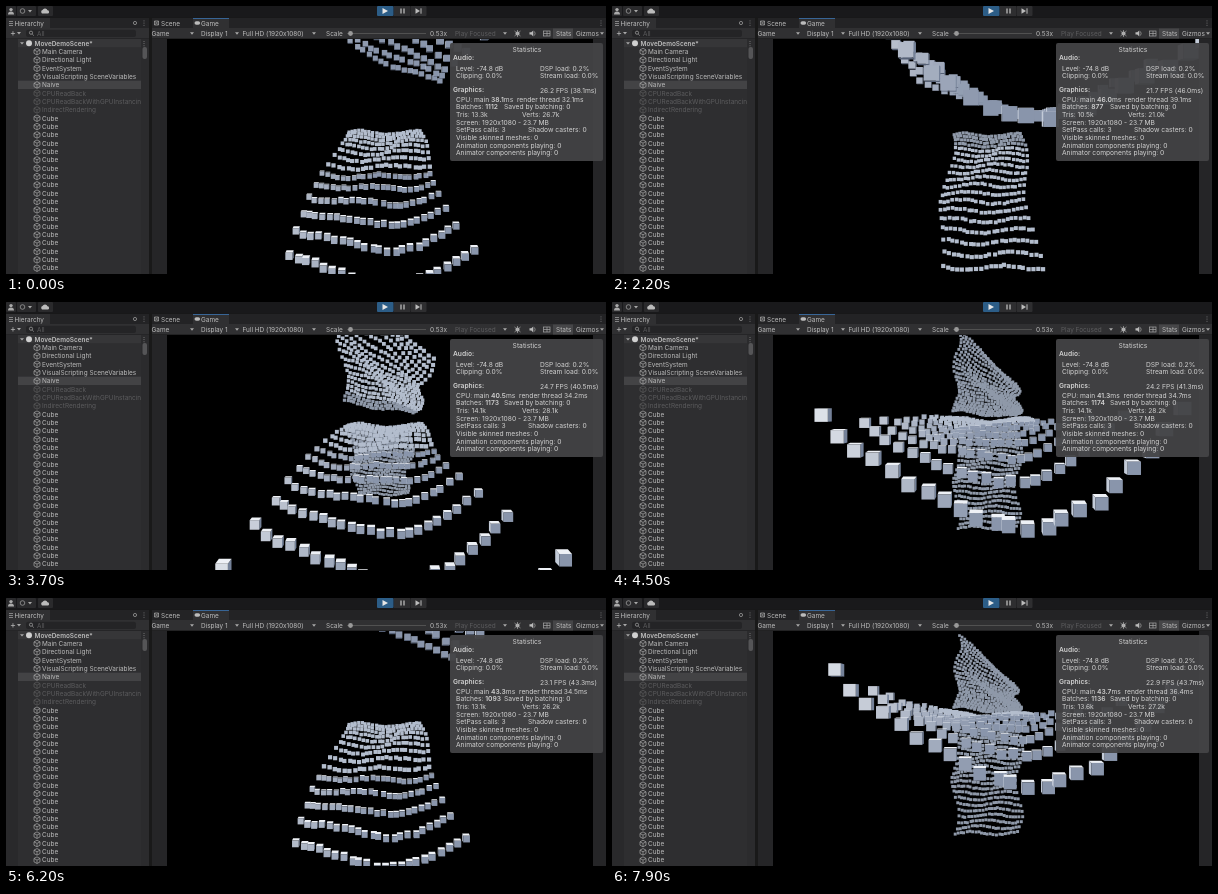
Write an HTML page with a canvas that moves like this. It is 600 px wide and 268 px high and loops after 8 s.

```html
<!DOCTYPE html>
<html lang="en">
<head>
<meta charset="utf-8">
<title>Moving cubes in an editor</title>
<style>
  html, body { margin: 0; width: 100%; height: 100%; overflow: hidden; background: #191919; }
  canvas, svg { position: absolute; left: 0; top: 0; width: 600px; height: 268px; }
  text { font: 6.45px Inter, "Liberation Sans", sans-serif; fill: #bdbdbd; white-space: pre; }
  .stats text { font-size: 6.7px; fill: #d2d2d2; }
  .dim { fill: #5c5c5e; }
  .bold { font-weight: 600; }
  .line { fill: none; stroke: #a8a8a8; stroke-width: .7; }
</style>
</head>
<body>
<canvas id="view" width="600" height="268"></canvas>
<svg id="ui" viewBox="0 0 600 268"></svg>
<script>
const LOOP = 8000, STEP = 100, PERIOD = Math.PI;
const ROWS = 24, COLS = 22, REACH = 1.6, NEAR = .13;
const AXIS = { x: 375, y: 118 };
const HALF_WIDTH = 32, DROP = 75, RISE = 45, SAG = 28;
const { sin, cos, exp, floor } = Math;
const ctx = document.getElementById('view').getContext('2d');
const ui = document.getElementById('ui');

function noise(n) {
  const s = sin(n * 12.9898) * 43758.5453;
  return s - floor(s) - .5;
}

const bell = (x, middle, spread) => exp(-(((x - middle) / spread) ** 2));

// One blade of cubes swings about a far horizontal axis: from hanging down (angle 0),
// towards the camera (a quarter turn) and on to standing up (half a turn).
function blade(age) {
  const angle = .82 + .57 * age;
  if (angle < -.75 || angle > 3.6) return [];
  const forward = sin(angle) * (sin(angle) < 0 ? .3 : 1);
  const up = Math.max(0, -cos(angle));
  const height = cos(angle) * (cos(angle) > 0 ? DROP : RISE);
  const hollow = .12 + 1.2 * bell(angle, 2.4, .35);
  const cubes = [];
  for (let r = 0; r < ROWS; r++) {
    const rho = .12 + (REACH - .12) * (r / (ROWS - 1)) ** 1.3;
    const depth = 1 - rho * forward;
    if (rho < hollow || depth < NEAR) continue;
    const sag = SAG * rho * rho * Math.max(0, forward) ** 3;
    const sway = .12 * sin(rho * 7 + age);
    for (let c = 0; c < COLS; c++) {
      const a = c / (COLS - 1) * 2 - 1, id = r * COLS + c;
      const across = HALF_WIDTH * (a + sway + noise(id) * .04);
      const down = rho * height + sag * (1 - a * a) + 20 * a * rho * up +
        1.6 * sin(a * 4 + rho * 8) + noise(id + 900);
      cubes.push({ x: AXIS.x + across / depth, y: AXIS.y + down / depth, depth });
    }
  }
  return cubes;
}

function face(color, ...points) {
  ctx.fillStyle = color;
  ctx.beginPath();
  points.forEach(([x, y]) => ctx.lineTo(x, y));
  ctx.fill();
}

function drawCube({ x, y, depth }) {
  const size = .8 + 2.2 / depth, h = size / 2;
  if (size < 4.5) {
    ctx.fillStyle = size < 3.2 ? '#8f99a9' : '#b3bdcd';
    ctx.fillRect(x - h, y - h, size, size);
    return;
  }
  const lit = Math.max(0, Math.min(1, (370 - x) / 170));
  const dx = (AXIS.x - x) * size * .0018, dy = (AXIS.y - 15 - y) * size * .0024;
  const sx = x + Math.sign(dx) * h, sy = y + Math.sign(dy) * h;
  face(x < AXIS.x ? '#748198' : '#c3cbd8',
    [sx, y - h], [sx + dx, y - h + dy], [sx + dx, y + h + dy], [sx, y + h]);
  face(dy < 0 ? '#eef1f6' : '#566176',
    [x - h, sy], [x - h + dx, sy + dy], [x + h + dx, sy + dy], [x + h, sy]);
  ctx.fillStyle = `rgb(${137 + 88 * lit},${149 + 80 * lit},${171 + 64 * lit})`;
  ctx.fillRect(x - h, y - h, size, size);
}

function drawView(seconds) {
  ctx.fillStyle = '#000';
  ctx.fillRect(161, 33, 426, 235);
  ctx.save();
  ctx.beginPath();
  ctx.rect(161, 33, 426, 235);
  ctx.clip();
  const age = seconds % PERIOD;
  [-1, 0, 1].flatMap(turn => blade(age + turn * PERIOD))
    .sort((a, b) => b.depth - a.depth)
    .forEach(drawCube);
  ctx.restore();
}

const rect = (x, y, w, h, fill, extra = '') =>
  `<rect x="${x}" y="${y}" width="${w}" height="${h}" fill="${fill}" ${extra}/>`;
const text = (x, y, s, attrs = '') => `<text x="${x}" y="${y}" ${attrs}>${s}</text>`;
const path = (d, attrs = 'class="line"') => `<path d="${d}" ${attrs}/>`;
const dots = (x, y) => path(`M${x} ${y}v.8m0 1.4v.8m0 1.4v.8`);
const arrow = (x, y) => path(`M${x} ${y}h4l-2 2.4z`, 'fill="#a8a8a8"');
const boxIcon = (x, y, color) =>
  path(`M${x} ${y - 3.3}l3 1.6v3.4l-3 1.6l-3 -1.6v-3.4zM${x - 3} ${y - 1.7}l3 1.6l3 -1.6M${x} ${y}v3.2`,
    `fill="none" stroke="${color}" stroke-width=".7"`);

function hierarchy() {
  const names = ['Main Camera', 'Directional Light', 'EventSystem', 'VisualScripting SceneVariables',
    'Naive', 'CPUReadBack', 'CPUReadBackWithGPUInstancin', 'IndirectRendering', ...Array(19).fill('Cube')];
  let out = rect(0, 12, 143, 256, '#2e2e30') + rect(0, 12, 143, 10, '#232325') +
    rect(0, 12, 44, 10, '#303032') + rect(0, 22, 143, 10.5, '#303032') + rect(0, 32, 143, .6, '#1e1e20') +
    rect(0, 33, 12, 235, '#29292b') + rect(12, 33, 123, 8.2, '#363638') +
    rect(12, 74.7, 123, 8.3, '#434345') + rect(135, 33, 8, 235, '#2b2b2d') +
    rect(136.5, 41, 4.5, 12, '#555557', 'rx="2"') +
    path('M3 15.5h4M3 17.5h4M3 19.5h4') + text(8.5, 19.6, 'Hierarchy') +
    text(4, 29.7, '+', 'style="font-size:9px"') + arrow(11, 26) +
    rect(20, 23.7, 110, 7.4, '#242426', 'rx="2"') + text(31, 29.6, 'All', 'class="dim"') +
    '<circle cx="25" cy="26.7" r="1.6" class="line"/>' + path('M26.2 28l1.6 1.6') +
    '<circle cx="129" cy="17" r="1.6" class="line"/>' + dots(138, 14.5) +
    arrow(14, 36.2) + '<circle cx="23" cy="37.3" r="3" fill="#d0d0d0"/>' +
    text(28.5, 39.6, 'MoveDemoScene*', 'class="bold"') + dots(138, 35);
  names.forEach((name, i) => {
    const y = 45.6 + i * 8.33, off = i > 4 && i < 8;
    out += boxIcon(31, y, off ? '#5c5c5e' : '#a8a8a8') + text(36, y + 2.3, name, off ? 'class="dim"' : '');
  });
  return out;
}

function toolbar() {
  return rect(0, 0, 600, 11.5, '#19191b') + rect(0, 0, 10, 10, '#2a2a2c', 'rx="1"') +
    rect(11, 0, 19, 10, '#2a2a2c', 'rx="1"') + rect(32, 0, 15, 10, '#2a2a2c', 'rx="1"') +
    '<circle cx="5" cy="3.6" r="1.7" fill="#aaa"/>' + path('M2 8.5a3 3 0 0 1 6 0z', 'fill="#aaa"') +
    '<circle cx="16.5" cy="5" r="2.3" class="line"/>' + arrow(22, 4) +
    path('M36 7.5a2 2 0 0 1 .5 -3.5a2.7 2.7 0 0 1 5 .3a1.7 1.7 0 0 1 .7 3.2z', 'fill="#bbb"') +
    rect(371, 0, 16.5, 10, '#2c5d87', 'rx="1"') + rect(388, 0, 16, 10, '#2e2e30') +
    rect(404.5, 0, 16, 10, '#2e2e30', 'rx="1"') + path('M376.5 2l5.5 3l-5.5 3z', 'fill="#e6e6e6"') +
    path('M395 2.5v5M398 2.5v5', 'stroke="#bbb" stroke-width="1.3"') +
    path('M409.5 2.3l4.5 2.7l-4.5 2.7z', 'fill="#bbb"') + path('M415 2.3v5.4', 'stroke="#bbb"');
}

function gamePanel() {
  return rect(146, 12, 454, 10, '#232325') + rect(187, 12, 36, 10, '#303032') +
    rect(187, 12, 36, .8, '#3a72b0') + rect(146, 22, 454, 10.6, '#303032') +
    rect(146, 32.4, 454, .6, '#1e1e20') + rect(146, 33, 15, 235, '#252527') + rect(587, 33, 13, 235, '#252527') +
    path('M148.5 15l4 4M152.5 15l-4 4M148.5 15h4v4h-4z') + text(155, 19.6, 'Scene') +
    rect(188.5, 15.2, 5.6, 3.6, '#bbb', 'rx="1.8"') + text(195, 19.6, 'Game') + dots(595, 14.5) +
    text(145.5, 29.8, 'Game') + arrow(184, 26.3) + text(195, 29.8, 'Display 1') + arrow(229, 26.3) +
    text(236.5, 29.8, 'Full HD (1920x1080)') + arrow(306, 26.3) + text(320, 29.8, 'Scale') +
    rect(341, 27, 79, .9, '#555') + '<circle cx="344.5" cy="27.5" r="2.4" fill="#999"/>' +
    text(424, 29.8, '0.53x') + text(449, 29.8, 'Play Focused', 'class="dim"') + arrow(497, 26.3) +
    '<circle cx="511.5" cy="27.5" r="2" fill="#b4b4b4"/>' + path('M508.5 25l6 5M514.5 25l-6 5M511.5 24v7') +
    path('M523.5 26.2h1.8l2 -1.8v6l-2 -1.8h-1.8z', 'fill="#bbb"') + path('M528.5 25.5q1.2 2 0 4') +
    rect(537.5, 25, 6.5, 5, 'none', 'class="line"') + path('M537.5 27.5h6.5M541 25v5') +
    rect(547, 22.5, 20, 10, '#464648') + text(550, 29.8, 'Stats') + text(570, 29.8, 'Gizmos') + arrow(594, 26.3);
}

function statsPanel() {
  const rows = ['Batches: <tspan class="bold" id="batches"></tspan>', '<tspan id="tris"></tspan>',
    'Screen: 1920x1080 - 23.7 MB', 'SetPass calls: 3', 'Visible skinned meshes: 0',
    'Animation components playing: 0', 'Animator components playing: 0'];
  return '<g class="stats">' + rect(444, 37, 153, 118, '#444446', 'fill-opacity=".95" rx="2"') +
    text(521, 45.7, 'Statistics', 'text-anchor="middle"') +
    text(447, 54.3, 'Audio:', 'class="bold"') +
    text(450, 64.7, 'Level: -74.8 dB') + text(534, 64.7, 'DSP load: 0.2%') +
    text(450, 72.3, 'Clipping: 0.0%') + text(534, 72.3, 'Stream load: 0.0%') +
    text(447, 86, 'Graphics:', 'class="bold"') + text(534, 87.3, '', 'id="fps"') +
    text(450, 95.7, 'CPU: main <tspan class="bold" id="main"></tspan>ms  <tspan id="render"></tspan>') +
    rows.map((s, i) => text(450, 103.4 + i * 7.65, s)).join('') +
    text(498, 103.4, 'Saved by batching: 0') + text(516, 111.05, '', 'id="verts"') +
    text(522, 126.35, 'Shadow casters: 0') + '</g>';
}

ui.innerHTML = toolbar() + hierarchy() + gamePanel() + statsPanel();

// Seconds, main thread ms, render thread ms.
const LOAD = [[0, 38.1, 32.1], [.9, 40.5, 34.4], [2.2, 46, 39.1], [3.7, 40.5, 34.2],
  [4.5, 41.3, 34.7], [6.2, 43.3, 34.5], [7.9, 43.7, 36.4]];

function loadAt(seconds) {
  const i = Math.max(1, LOAD.findIndex(key => key[0] >= seconds));
  const a = LOAD[i - 1], b = LOAD[i], f = (seconds - a[0]) / (b[0] - a[0]);
  return a.map((n, k) => n + (b[k] - n) * f);
}

function put(id, value) {
  document.getElementById(id).textContent = value;
}

function updateStats(seconds) {
  const [, main, render] = loadAt(seconds);
  const age = seconds % PERIOD, lowest = 2.2;
  const dip = bell(age, lowest, age < lowest ? .42 : .77) + bell(age + PERIOD, lowest, .77);
  const batches = Math.round(1180 - 303 * dip), drawn = batches - 1;
  put('batches', batches);
  put('main', main.toFixed(1));
  put('render', `render thread ${render.toFixed(1)}ms`);
  put('fps', `${(1000 / main).toFixed(1)} FPS (${main.toFixed(1)}ms)`);
  put('tris', `Tris: ${(drawn * .012).toFixed(1)}k`);
  put('verts', `Verts: ${(drawn * .024).toFixed(1)}k`);
}

let start, shown;
function tick(now) {
  start ??= now;
  const time = floor(((now - start) % LOOP) / STEP) * STEP;
  if (time !== shown) {
    shown = time;
    drawView(time / 1000);
    updateStats(time / 1000);
  }
  requestAnimationFrame(tick);
}
requestAnimationFrame(tick);
</script>
</body>
</html>
```
